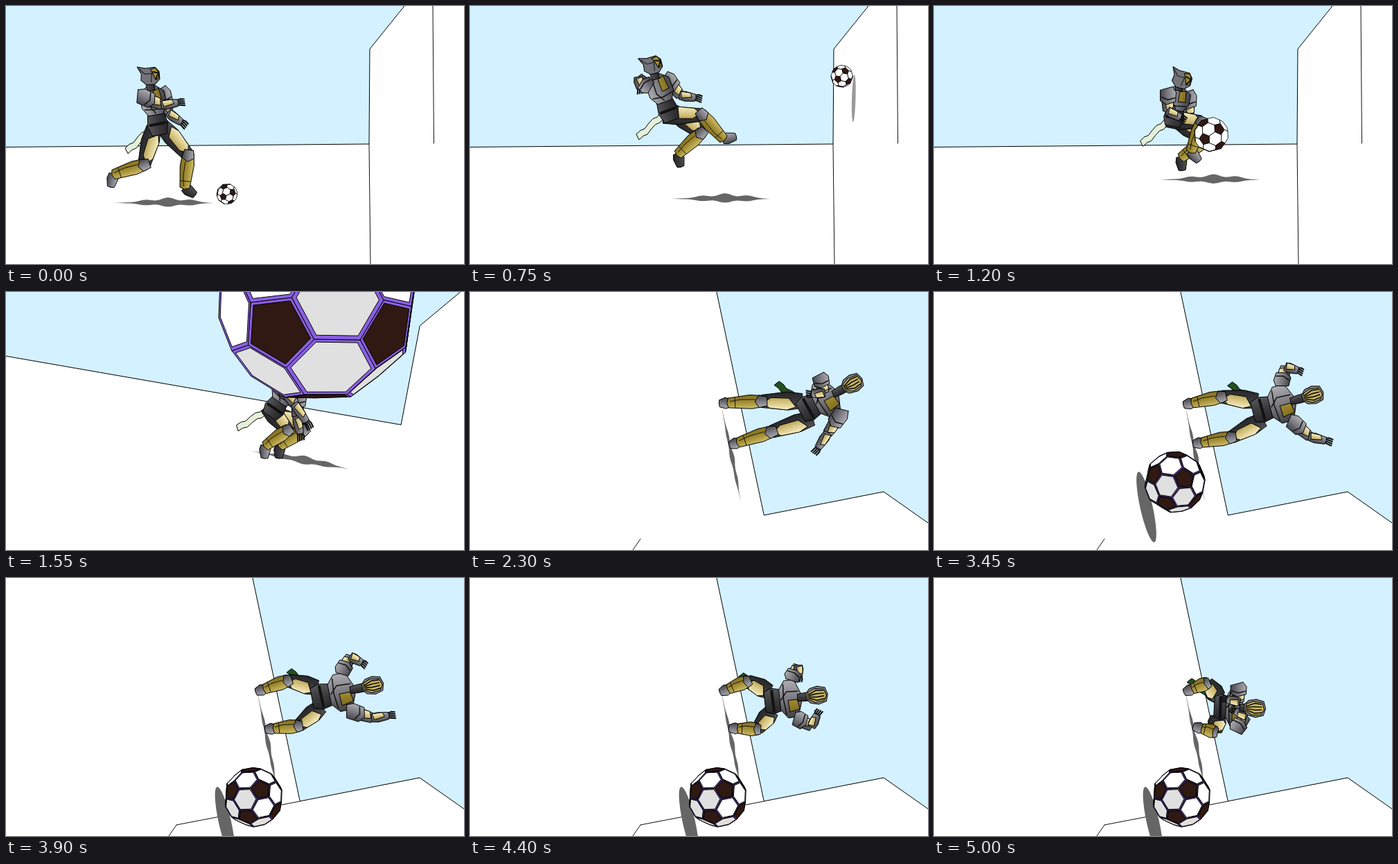
Write an HTML page with a canvas that moves like this. It is 661x372 px and loops after 5.05 s.

```html
<!DOCTYPE html>
<html lang="en">
<head>
<meta charset="utf-8">
<title>Kick</title>
<style>
html, body { margin: 0; width: 100%; height: 100%; overflow: hidden; background: #fff; }
canvas { display: block; width: 100%; height: 100%; }
</style>
</head>
<body>
<canvas id="stage" width="661" height="372"></canvas>
<script>
const ctx = document.getElementById('stage').getContext('2d');
const LOOP = 5050, STEP = 50;
const HIT = 1480, LANDED = 1700, ROLL = 1.37;

const METAL = ['#adadb3', '#7a7a80', '#414146'];
const DARK = ['#58585b', '#3a3a3d', '#252528'];
const GOLD = ['#cdbd6c', '#a28d32', '#806b20'];
const PALE = ['#f8efc4', '#cfbc75', '#8c7728'];

// Only pelvis, chest, hands and feet are posed; knees, elbows and head follow.
const PLANTED = [[373, 160], [387, 217]];
const poses = [
  { t: 0, pelvis: [220, 176], chest: [211, 128], hands: [[252, 139], [256, 170]], feet: [[155, 243], [258, 262]] },
  { t: 150, pelvis: [240, 178], chest: [230, 130], hands: [[200, 158], [275, 160]], feet: [[296, 262], [256, 262]] },
  { t: 750, pelvis: [288, 156], chest: [271, 111], hands: [[246, 122], [329, 133]], feet: [[366, 192], [300, 214]] },
  { t: 1550, pelvis: [385, 172], chest: [408, 138], hands: [[436, 191], [425, 208]], feet: [[374, 222], [395, 222]] },
  { t: 1700, pelvis: [440, 175], chest: [478, 172], hands: [[430, 140], [430, 220]], feet: PLANTED },
  { t: 2300, pelvis: [484, 170], chest: [520, 150], hands: [[490, 147], [500, 228]], feet: PLANTED },
  { t: 3050, pelvis: [484, 170], chest: [525, 156], hands: [[538, 106], [580, 230]], feet: PLANTED },
  { t: 3900, pelvis: [450, 172], chest: [492, 163], hands: [[516, 124], [556, 198]], feet: PLANTED },
  { t: 5000, pelvis: [410, 186], chest: [438, 187], hands: [[420, 174], [432, 190]], feet: PLANTED }
];
// Kick, wall, volley, lens, gone.
const bounces = [
  { t: 150, at: [319, 271], r: 15 },
  { t: 735, at: [545, 96], r: 16 },
  { t: 1000, at: [400, 190], r: 16 },
  { t: 1500, at: [400, 110], r: 170 },
  { t: 1700, at: [543, -158], r: 100 }
];
const shadowStarts = [
  { t: 0, at: [155, 284] }, { t: 750, at: [289, 278] },
  { t: 1550, at: [352, 229] }, { t: 1700, at: [362, 161] }
];

const clamp = u => Math.min(1, Math.max(0, u));
const add = (a, b, k = 1) => [a[0] + b[0] * k, a[1] + b[1] * k];
const mix = (a, b, u) => Array.isArray(a) ? a.map((v, i) => mix(v, b[i], u)) : a + (b - a) * u;

function turn([x, y], angle) {
  const c = Math.cos(angle), s = Math.sin(angle);
  return [x * c - y * s, x * s + y * c];
}

// The two keys around t and the progress between them.
function span(keys, t) {
  const i = Math.max(1, keys.findIndex((k, n) => k.t > t || n === keys.length - 1));
  const a = keys[i - 1], b = keys[i];
  return [a, b, clamp((t - a.t) / (b.t - a.t))];
}

function polygon(points, fill, width = 1) {
  ctx.beginPath();
  points.forEach(p => ctx.lineTo(p[0], p[1]));
  ctx.closePath();
  ctx.fillStyle = fill;
  ctx.fill();
  if (!width) return;
  ctx.lineWidth = width;
  ctx.strokeStyle = '#000';
  ctx.stroke();
}

function line(points, width = 1) {
  ctx.beginPath();
  points.forEach(p => ctx.lineTo(p[0], p[1]));
  ctx.lineWidth = width;
  ctx.strokeStyle = '#111';
  ctx.stroke();
}

function ellipse(x, y, rx, ry, angle, fill) {
  ctx.beginPath();
  ctx.ellipse(x, y, rx, ry, angle, 0, Math.PI * 2);
  ctx.fillStyle = fill;
  ctx.fill();
}

// Bone frame: u runs from a (0) to b (1), v is pixels sideways.
function boneFrame(a, b) {
  const dx = b[0] - a[0], dy = b[1] - a[1], len = Math.hypot(dx, dy) || 1;
  return (u, v) => [a[0] + dx * u - dy / len * v, a[1] + dy * u + dx / len * v];
}

function plate(a, b, shape, colors) {
  const at = boneFrame(a, b);
  const reach = Math.max(...shape.map(p => Math.abs(p[1])));
  const grad = ctx.createLinearGradient(...at(.5, -reach), ...at(.5, reach));
  colors.forEach((c, i) => grad.addColorStop(i / (colors.length - 1), c));
  polygon(shape.map(p => at(...p)), grad);
}

function limb(a, b, w1, w2, colors) {
  plate(a, b, [[-.05, -w1 * .8], [.3, -w1], [1, -w2], [1.05, 0], [1, w2], [.35, w1], [-.05, w1 * .8]], colors);
}

// Knee or elbow: the shorter the gap a-b, the further it is pushed sideways.
function joint(a, b, reach, bend) {
  const gap = Math.hypot(b[0] - a[0], b[1] - a[1]);
  return boneFrame(a, b)(.54, -bend * Math.sqrt(Math.max(0, reach * reach - gap * gap)) / 2);
}

function leg(hip, ankle, bend, fallen, boot) {
  const knee = joint(hip, ankle, 104, bend);
  const shin = boneFrame(knee, ankle);
  const direction = Math.atan2(ankle[1] - knee[1], ankle[0] - knee[0]);
  const toe = add(ankle, turn([18 - 5 * fallen, 0], direction - 1.05 * (1 - fallen)));
  limb(hip, knee, 13, 9, DARK);
  plate(hip, knee, [[.12, -9], [.35, -13], [.8, -10], [.96, -2], [.75, 5], [.3, 4]], PALE);
  limb(ankle, toe, 8, 5, boot);
  limb(knee, ankle, 10, 7, GOLD);
  line([shin(.2, 3), shin(.65, 4), shin(.95, 2)]);
  line([shin(.8, -7), shin(.8, 7)]);
  plate(knee, ankle, [[-.16, -7], [.08, -9], [.2, 0], [.08, 9], [-.16, 6]], METAL);
}

function arm(shoulder, hand, bend) {
  const elbow = joint(shoulder, hand, 62, bend);
  const at = boneFrame(elbow, hand);
  limb(shoulder, elbow, 9, 7, METAL);
  plate(shoulder, elbow, [[.3, -8], [.8, -8], [.95, 1], [.5, 5]], PALE);
  for (let v = -5; v <= 4; v += 3) line([at(.8, v * .7), at(1.02, v), at(1.2, v + 1)], 2.2);
  limb(elbow, at(.85, 0), 7, 5, METAL);
  plate(elbow, hand, [[0, -6], [.55, -6], [.65, 0], [.1, 3]], PALE);
  plate(shoulder, elbow, [[-.3, -7], [0, -12], [.5, -11], [.65, 2], [.45, 11], [-.1, 11]], METAL);
  const pad = boneFrame(shoulder, elbow);
  line([pad(.3, -10), pad(.4, 0), pad(.25, 9)], 1.5);
}

function helmet(head, chest, frontal) {
  ctx.save();
  ctx.translate(...head);
  ctx.rotate(Math.atan2(head[1] - chest[1], head[0] - chest[0]) + Math.PI / 2);
  if (frontal) {
    polygon([[-10, -13], [0, -16], [10, -13], [13, -2], [10, 10], [4, 15], [-5, 15], [-11, 9], [-13, -2]], '#85858a');
    polygon([[-8, -11], [2, -14], [9, -9], [10, 3], [4, 13], [-6, 12], [-10, 2]], '#c8b55f');
    for (let x = -6; x <= 6; x += 4) line([[x, -10], [x * 1.2, 0], [x * .5, 11]], 1.7);
  } else {
    polygon([[-14, -15], [-3, -11], [11, -10], [16, -3], [15, 8], [7, 14], [-5, 13], [-12, 5], [-10, -4]], '#737379');
    polygon([[4, -8], [12, -9], [15, -2], [14, 6], [9, 8], [7, 0]], '#a28d32');
    line([[7, -4], [15, -1], [9, 7]], 2);
    line([[-12, -12], [-5, -3], [5, -2], [2, 10]]);
  }
  ctx.restore();
}

function cloth(pelvis, roll, fill) {
  const edges = [[], []];
  for (let i = 0; i <= 6; i++) {
    const middle = [-10 - 6 * i, 1 + 5.5 * i + 2 * Math.sin(i * 2)];
    edges[0].push([middle[0] - 2, middle[1] - 4]);
    edges[1].unshift([middle[0] + 2, middle[1] + 4]);
  }
  polygon(edges.flat().map(p => add(pelvis, turn(p, roll))), fill);
}

function figure(t, { roll, fallen }) {
  const [from, to, u] = span(poses, t);
  const ease = u * u * (3 - 2 * u);
  const [pelvis, chest, hands, feet] =
    ['pelvis', 'chest', 'hands', 'feet'].map(part => mix(from[part], to[part], ease));
  const frontal = fallen > .5;
  const w = 15 + 15 * fallen;
  const torso = boneFrame(pelvis, chest);
  const head = torso(1.58 + .3 * fallen, 0);
  // Side view bends limbs the same way, front view mirrors them.
  const drawLeg = (i, side, boot) =>
    leg(torso(0, side * w / 2), feet[i], mix(.85, .3 * side, fallen), fallen, boot);
  const drawArm = (i, side) => arm(torso(1, side * w), hands[i], mix(-.6, -.6 * side, fallen));

  cloth(pelvis, roll, frontal ? '#24501f' : '#e5f0da');
  drawLeg(1, 1, frontal ? METAL : DARK);
  if (!frontal) drawArm(1, 1);
  drawLeg(0, -1, METAL);

  const half = 9 + w * .6, waist = 7 + w * .25;
  plate(pelvis, chest, [[-.2, -waist], [.1, -waist - 4], [.55, -waist], [.55, waist], [.1, waist + 4], [-.2, waist]], DARK);
  plate(pelvis, chest, [[.4, -waist], [.65, -half], [1.05, -half], [1.25, -7], [1.25, 7], [1.05, half], [.65, half], [.4, waist]], METAL);
  plate(pelvis, chest, [[.72, 2], [1.1, 2], [1.15, half * .6], [.75, half * .7]], GOLD);
  line([torso(.45, 0), torso(.7, -half * .4), torso(1.15, -half * .35)], 1.5);
  line([torso(.6, -half * .8), torso(.55, 0), torso(.6, half * .8)], 1.5);
  line([torso(.12, -waist), torso(.12, waist)], 4);

  if (frontal) drawArm(1, 1);
  limb(torso(1.15, 0), head, 6, 6, DARK);
  helmet(head, chest, frontal);
  drawArm(0, -1);
}

function figureShadow(t, { roll, fallen }) {
  const [a, b, u] = span(shadowStarts, t);
  const start = mix(a.at, b.at, u);
  const at = boneFrame(start, add(start, turn([145, 0], roll)));
  const edges = [[], []];
  for (let i = 0; i <= 24; i++) {
    const x = i / 24;
    const half = (8 - 4 * fallen) * Math.sin(Math.PI * x ** 1.2) ** 1.5 * (.75 + .25 * Math.sin(x * 26));
    edges[0].push(at(x, -half));
    edges[1].unshift(at(x, half * .7));
  }
  polygon(edges.flat(), '#666', 0);
}

// Truncated icosahedron: a pentagon per vertex, a hexagon per triangle.
const corners = [[0, 0, 1]];
for (let k = 0; k < 5; k++) {
  const a = k * Math.PI * .4;
  corners.push([.894 * Math.cos(a), .894 * Math.sin(a), .447]);
}
corners.push(...corners.map(v => v.map(n => -n)));
const near = (a, b) => {
  const d = a[0] * b[0] + a[1] * b[1] + a[2] * b[2];
  return d > .4 && d < .9;
};
const cut = (a, b) => mix(a, b, 1 / 3).map(v => v / .868);
const faces = [];
corners.forEach((a, i) => {
  faces.push({ dark: true, points: corners.filter(b => near(a, b)).map(b => cut(a, b)) });
  corners.forEach((b, j) => corners.forEach((c, k) => {
    if (i < j && j < k && near(a, b) && near(b, c) && near(a, c)) {
      faces.push({ dark: false, points: [cut(a, b), cut(b, a), cut(b, c), cut(c, b), cut(c, a), cut(a, c)] });
    }
  }));
});

function drawBall({ at, r, spin, tiltX, tiltY }, roll) {
  const small = r < 30;
  const orient = ([x, y, z]) => {
    [x, y] = turn([x, y], spin);
    [z, x] = turn([z, x], tiltY);
    [y, z] = turn([y, z], tiltX);
    const closeness = 1 + z * r / 800;
    return [x * closeness, y * closeness, z];
  };
  const shade = turn([.5, .7], roll);
  for (const face of faces) {
    const points = face.points.map(orient);
    const mid = [0, 1, 2].map(i => points.reduce((sum, p) => sum + p[i], 0) / points.length);
    if (mid[2] <= 0) continue;
    const angle = p => Math.atan2(p[1] - mid[1], p[0] - mid[0]);
    points.sort((a, b) => angle(a) - angle(b));
    const outline = k => points.map(p => add(at, mix(mid, p, k), r));
    const shaded = !small && mid[0] * shade[0] + mid[1] * shade[1] > .05;
    const fill = face.dark ? '#2f1912' : shaded ? '#e0e0e0' : '#fff';
    if (!small) polygon(outline(1), '#8960e2');
    polygon(outline(small ? 1 : .9), fill, small ? .8 : 1);
  }
}

function ballAt(t) {
  if (t < LANDED) {
    // Size is inverse depth, so positions are mixed in perspective.
    const [a, b, u] = span(bounces, t);
    const r = 1 / mix(1 / a.r, 1 / b.r, u);
    const at = mix(a.at.map(v => v / a.r), b.at.map(v => v / b.r), u).map(v => v * r);
    return { at, r, spin: .09 + (1550 - Math.max(t, 150)) / 200, tiltX: -.3, tiltY: -.39 };
  }
  // Rolls past the fallen camera and slows to a stop.
  const left = 2.62e-4 * Math.max(0, 3850 - t) ** 2, k = left / 168;
  return { at: [357 - left * .226, 316 - left], r: 43 + left * .03,
    spin: .68 - 4.43 * k, tiltX: .27 - .57 * k, tiltY: .26 + .22 * k };
}

// The camera is knocked over: it rolls about a pivot with a sideways jolt.
function cameraAt(t) {
  const u = clamp((t - HIT) / (LANDED - HIT));
  const fallen = u ** 1.77, roll = ROLL * fallen, zoom = 1 + .285 * u ** 1.36;
  const pivot = add([417, 183], [53, -34], Math.sin(Math.PI * u));
  return { fallen, roll, place: p => add(pivot, turn(add(p, [-417, -183]), roll), zoom) };
}

function background(t, { place, fallen }) {
  ctx.fillStyle = '#fff';
  ctx.fillRect(0, 0, 661, 372);
  const ceiling = [1025, -558 + 147 * fallen];
  polygon([[-1476, 216], [524, 199], [525, 62], ceiling, [1025, -2300], [-1476, -2300]].map(place), '#d4f1ff');
  if (t < 1500) {
    line([[524, 199], [526, 372]]);
    line([[616, 0], [617.5, 198]]);
  }
  if (t >= LANDED) line([[235, 372], [246, 356]]);
  if (t >= 3600) line([[246, 356], [424, 322]]);
}

function draw(t) {
  const camera = cameraAt(t), ball = ballAt(t), [x, y] = ball.at;
  background(t, camera);
  figureShadow(t, camera);
  if (t > 450 && t < 900) ellipse(x + 17, y + 32, 2.7, 34, .03, '#999');
  if (t >= LANDED) ellipse(x - 41, y + 36, 9, 52, -.22, '#666');
  figure(t, camera);
  drawBall(ball, camera.roll);
}

ctx.lineJoin = 'round';
ctx.lineCap = 'round';
function tick() {
  draw(Math.floor(performance.now() % LOOP / STEP) * STEP);
  requestAnimationFrame(tick);
}
tick();
</script>
</body>
</html>
```
